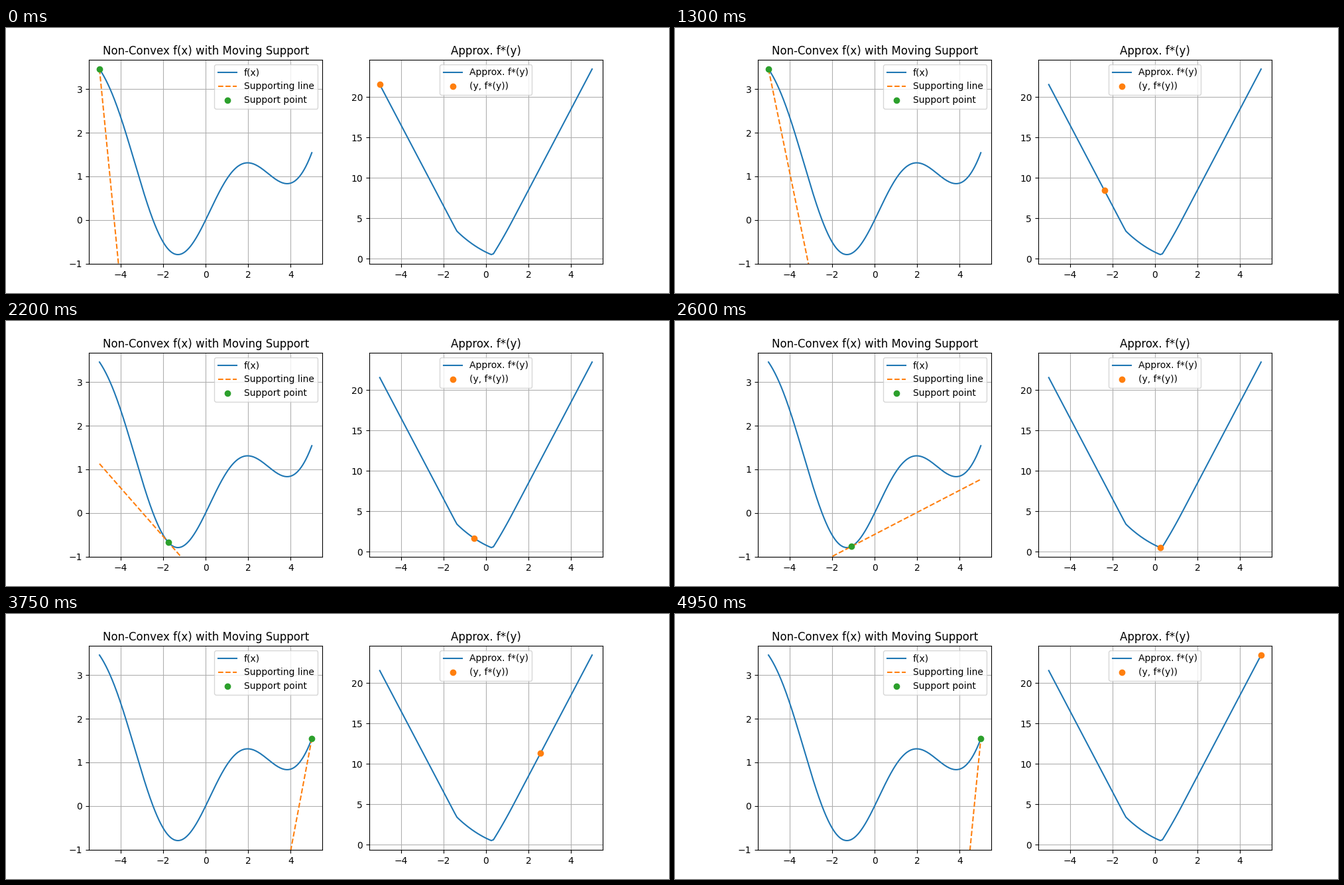
Animation, 1000 px wide and 400 px high, one loop 5000 ms. Source, as a matplotlib script:

```python
import numpy as np
import matplotlib.pyplot as plt
from matplotlib.animation import FuncAnimation

plt.rcParams["font.family"] = "DejaVu Sans"

FRAMES = 100
INTERVAL = 50


def f(x):
    return np.sin(x) + 0.1 * x**2


xs = np.linspace(-5, 5, 400)
slopes = np.linspace(-5, 5, FRAMES)

# Discrete conjugate: f*(y) = max over x of (x*y - f(x))
gaps = np.outer(slopes, xs) - f(xs)
best = gaps.argmax(axis=1)
conjugate = gaps.max(axis=1)

fig, (left, right) = plt.subplots(1, 2, figsize=(10, 4), dpi=100)

left.plot(xs, f(xs), label="f(x)")
support_line, = left.plot([], [], "--", label="Supporting line")
support_dot, = left.plot([], [], "o", label="Support point")
left.set_title("Non-Convex f(x) with Moving Support")
left.legend(loc="upper right")
left.grid(True)

right.plot(slopes, conjugate, label="Approx. f*(y)")
conjugate_dot, = right.plot([], [], "o", label="(y, f*(y))")
right.set_title("Approx. f*(y)")
right.legend(loc="upper center")
right.grid(True)


def update(i):
    slope, value, x = slopes[i], conjugate[i], xs[best[i]]
    support_line.set_data(xs, slope * xs - value)
    support_dot.set_data([x], [f(x)])
    conjugate_dot.set_data([slope], [value])
    return support_line, support_dot, conjugate_dot


anim = FuncAnimation(fig, update, frames=FRAMES, interval=INTERVAL,
                     repeat=True, repeat_delay=0, blit=False)
plt.show()
```
